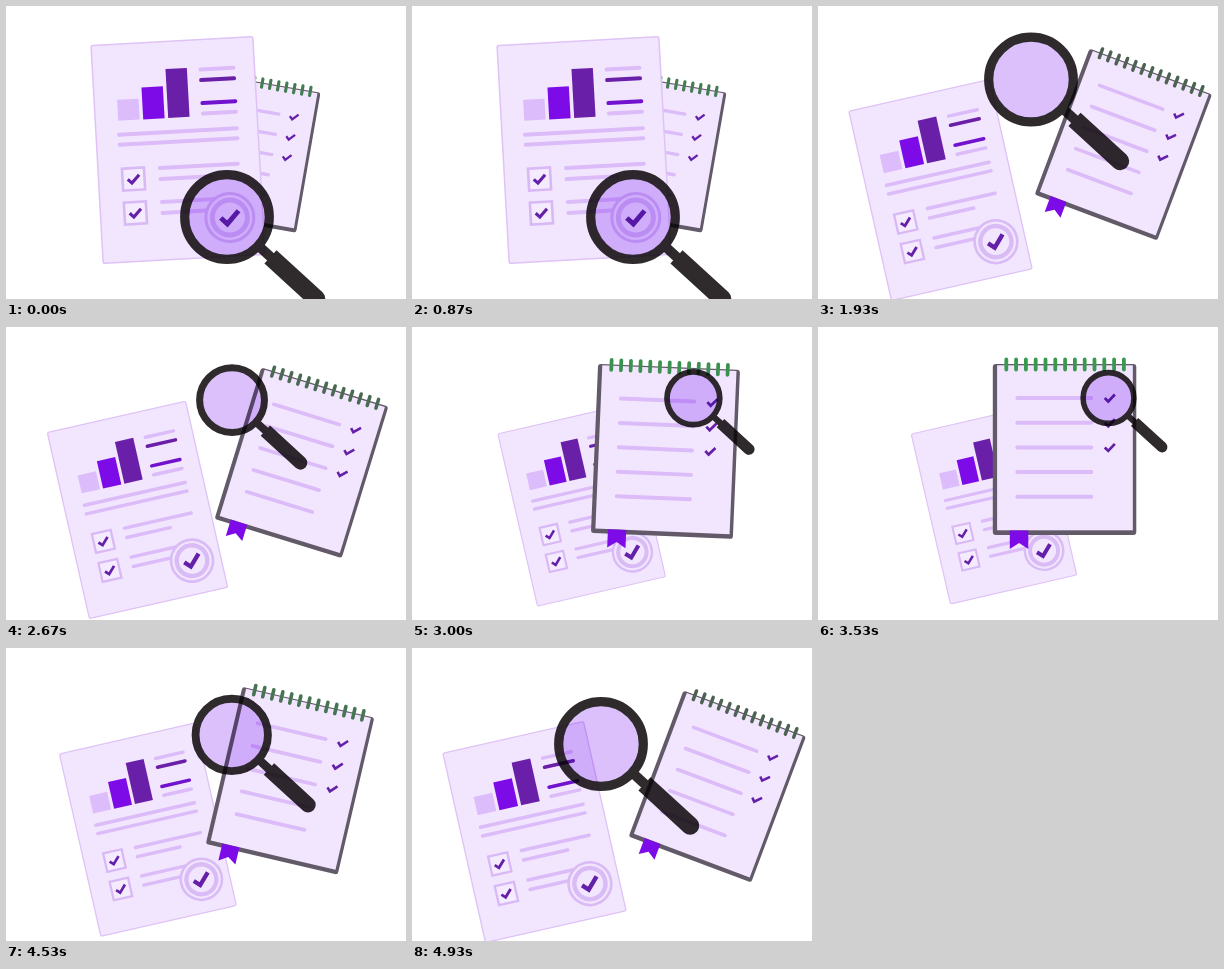
Recreate the animation shown at these times as an HTML page. Size 400 px wide and 293 px high, loop 5 s.

```html
<!DOCTYPE html>
<html lang="en">
<head>
<meta charset="utf-8">
<title>Document review</title>
<style>
  html, body { margin: 0; width: 100%; height: 100%; overflow: hidden; background: #fff; }
  svg { display: block; width: 100vw; height: 100vh; }
  .line { stroke: #dcbcf8; stroke-width: 4; stroke-linecap: round; }
  .check { fill: none; stroke: #6420a8; stroke-width: 3; }
  .box { fill: #f5ebff; stroke: #d8b8f5; stroke-width: 2.6; }
  .ring { fill: none; stroke: #d9bbf6; }
  #glass { mix-blend-mode: multiply; }
</style>
</head>
<body>
<svg viewBox="0 0 400 293">
  <rect width="400" height="293" fill="#fff"/>
  <g id="pages">
    <g id="pad"></g>
    <g id="sheet"></g>
  </g>
  <g id="glass">
    <circle r="40" fill="#dcc0fc"/>
    <circle r="42.3" fill="none" stroke="#2f2b2d" stroke-width="9.2"/>
    <g transform="rotate(42.5)" fill="#2f2b2d">
      <rect x="45" y="-5" width="17" height="10"/>
      <path d="M59 -9H121A9 9 0 0 1 121 9H59Z"/>
    </g>
  </g>
</svg>
<script>
const $ = id => document.getElementById(id);
const pages = $('pages'), pad = $('pad'), sheet = $('sheet'), glass = $('glass');
const paper = '#f2e6fe', violet = '#7d0be8', plum = '#6a1fa8';

const line = (x1, x2, y, color = '#dcbcf8') =>
  `<path class="line" d="M${x1} ${y}H${x2}" style="stroke:${color}"/>`;
const check = (x, y, size) =>
  `<path class="check" d="M-5.5 0L-1.7 3.8L5.5 -3.8" transform="translate(${x} ${y}) scale(${size})"/>`;
const bar = (color, i) => {
  const height = 21 + 8 * i + 3 * i * i;
  return `<rect x="${25 * i - 58}" y="${-32.5 - height}" width="21.4" height="${height}" fill="${color}"/>`;
};
const task = y =>
  `<rect class="box" x="-57" y="${y - 1.5}" width="22" height="22"/>` + check(-46, y + 9.5, 1.05) +
  line(-19, 59, y) + line(-19, 32, y + 11);

// Report sheet, centred on its own origin
sheet.innerHTML =
  `<rect x="-81" y="-109" width="162" height="218" rx="2" fill="${paper}" stroke="#dfc3f6" stroke-width="1.5"/>` +
  ['#dcbcfb', violet, plum].map(bar).join('') +
  line(27, 60, -79) + line(27, 60, -68.5, plum) +
  line(27, 60, -45.5, '#7112cf') + line(27, 60, -35) +
  line(-58, 60, -18.5) + line(-58, 60, -8.5) +
  task(17) + task(51) +
  `<g transform="translate(48 70.3)"><circle r="24.5" fill="${paper}"/>` +
  '<circle class="ring" r="24" stroke-width="3"/><circle class="ring" r="17.5" stroke-width="5"/>' +
  check(0, 0, 1.65) + '</g>';

// Spiral notepad, centred on its own origin
let rows = '', coils = '';
for (let i = 0; i < 5; i++) {
  const y = 24.7 * i - 51;
  rows += line(-47, 27, y) + (i < 3 ? check(45.5, y, .92) : '');
}
for (let x = -58; x < 62; x += 9.8) coils += `M${x} -89.5v10`;
pad.innerHTML =
  '<rect x="-71.5" y="-85" width="143.5" height="171" rx="3" fill="#625a68"/>' +
  `<rect x="-67.2" y="-83.7" width="135.7" height="165" fill="${paper}"/>` +
  `<path d="M-54.5 81.5h18.5v18.5l-9.2 -6l-9.3 6z" fill="${violet}"/>` + rows +
  `<path id="coils" d="${coils}" stroke-width="3.8" stroke-linecap="round"/>`;
const coilPath = $('coils');

// Poses: x, y, angle, scale
const stacked = { sheet: [172, 144, -3.2, 1], pad: [243.5, 146, 9.9, .83], glass: [221, 211] };
const apart = { sheet: [122.5, 184, -12.7, .89], pad: [305.3, 138, 20.6, .912], glass: [213, 73.5] };
const front = { sheet: [176, 177.5, -13, .8], pad: [246.3, 122, 0, 1], glass: [290.5, 71] };
const leaving = { ...apart, glass: [189, 96] };

// Ease-out progress from one time to another
const ease = (t, from, to) => 1 - (1 - Math.min(1, Math.max(0, (t - from) / (to - from)))) ** 2;
const mix = (a, b, u) => a.map((v, i) => v + (b[i] - v) * u);

function place(node, [x, y, angle, scale]) {
  node.setAttribute('transform', `translate(${x} ${y}) rotate(${angle}) scale(${scale})`);
}

function draw(t) {
  const spread = ease(t, 1100, 1850), lift = ease(t, 1100, 1780);
  const raise = ease(t, 2620, 3200), back = ease(t, 4300, 4880);
  const pose = (part, first = spread) =>
    mix(mix(mix(stacked[part], apart[part], first), front[part], raise), leaving[part], back);

  const padPose = pose('pad');
  const zoom = 1 - .4 * (ease(t, 2380, 3200) - back);
  place(sheet, pose('sheet'));
  place(pad, padPose);
  place(glass, [...pose('glass', lift), 0, zoom]);

  // Coils lose their green as the pad tilts
  const green = 45 - 1.6 * padPose[2];
  coilPath.setAttribute('stroke', `hsl(135 ${green}% ${32 + green / 5}%)`);

  // The pages swap depth while they are apart
  const top = t > 2200 && t < 4700 ? pad : sheet;
  if (pages.lastElementChild !== top) pages.append(top);
}

const start = performance.now();
function loop() {
  draw((performance.now() - start) % 5000);
  requestAnimationFrame(loop);
}
loop();
</script>
</body>
</html>
```
